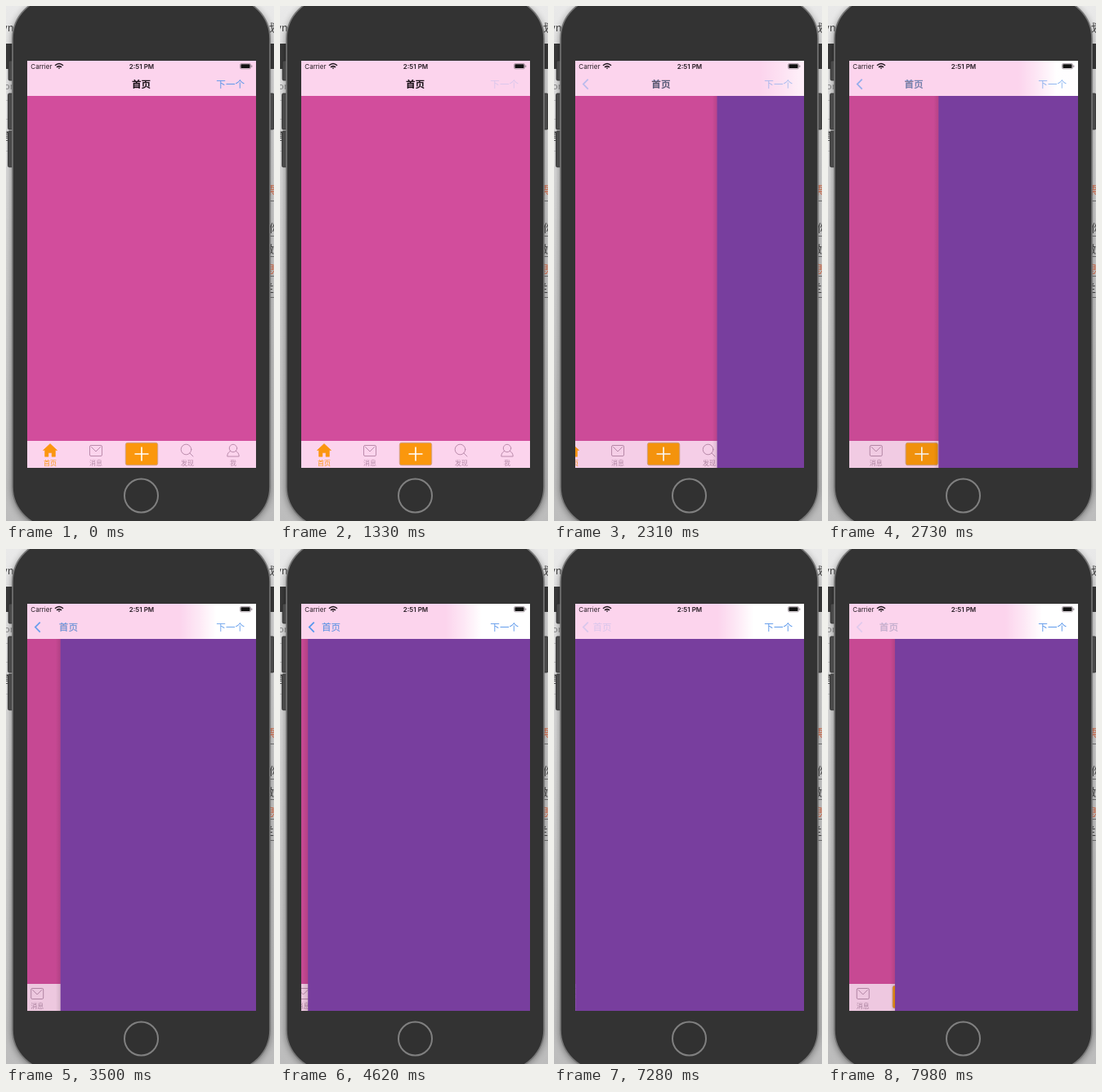
Recreate the animation shown at these times as an HTML page. Size 328 by 630 pixels, loop 8000 ms.

```html
<!DOCTYPE html>
<html lang="zh-CN">
<head>
<meta charset="utf-8">
<style>
html, body { margin: 0; width: 100%; height: 100%; overflow: hidden; background: #ccc; }
svg { display: block; width: 328px; height: 630px; }
text { font-family: "Noto Sans CJK SC", "Noto Sans CJK", sans-serif; }
.latin { font-family: Inter, Roboto, sans-serif; font-size: 8px; fill: #241a22; }
.nav { font-size: 11.6px; text-anchor: middle; }
.tab { font-size: 8px; text-anchor: middle; fill: #b58aa8; }
.icon { fill: none; stroke: #bb8cac; stroke-width: 1; stroke-linejoin: round; stroke-linecap: round; }
.line { fill: none; stroke: #777; stroke-width: 1; }
.side { font-size: 13px; fill: #444; }
.hot { fill: #df6a45; }
</style>
</head>
<body>
<svg viewBox="0 0 328 630">
  <defs>
    <linearGradient id="wall" x2="0" y2="1">
      <stop offset="0" stop-color="#e9e9e9"/>
      <stop offset=".3" stop-color="#d9d9d9"/>
      <stop offset="1" stop-color="#bcbcbc"/>
    </linearGradient>
    <linearGradient id="fade" gradientUnits="userSpaceOnUse" x1="200" x2="244" y1="0" y2="0">
      <stop offset="0" stop-color="#fff" stop-opacity="0"/>
      <stop offset=".5" stop-color="#fff" stop-opacity=".45"/>
      <stop offset="1" stop-color="#fff"/>
    </linearGradient>
    <linearGradient id="shade">
      <stop offset="0" stop-opacity="0"/>
      <stop offset="1" stop-opacity=".1"/>
    </linearGradient>
    <filter id="blur" x="-10%" width="120%" y="-10%" height="120%"><feGaussianBlur stdDeviation="4"/></filter>
    <clipPath id="view"><rect x="26" y="110" width="280" height="455"/></clipPath>
  </defs>

  <!-- desktop behind the phone -->
  <rect width="328" height="630" fill="url(#wall)"/>
  <rect y="46" width="328" height="31" fill="#3a3a3a"/>
  <g class="side">
    <text x="-5" y="31">yn</text>
    <text x="-2" y="102" font-size="11" fill="#888">or</text>
    <text x="-5" y="164">言</text>
    <text x="322" y="31">划</text>
    <text x="317" y="230" class="hot">票</text>
    <text x="322" y="276">你</text>
    <text x="315" y="302">微</text>
    <text x="317" y="326" class="hot">息</text>
    <text x="315" y="350">兰</text>
  </g>
  <path class="line" d="M0 115.5H9M0 138.5H9M0 177.5H9" opacity=".35"/>
  <path class="line" d="M320 238.5h8M320 281.5h8M320 306.5h8M320 330.5h8M320 356.5h8"/>
  <rect x="7" y="-8" width="317" height="648" rx="51" opacity=".4" filter="url(#blur)"/>

  <!-- phone body -->
  <g fill="#4a4a4a" stroke="#2c2c2c" stroke-width=".8">
    <rect x="3" y="67" width="8" height="24" rx="1.5"/>
    <rect x="2.5" y="107" width="8" height="44" rx="1.5"/>
    <rect x="2.5" y="153" width="8" height="44" rx="1.5"/>
    <rect x="320" y="107" width="8" height="44" rx="1.5"/>
  </g>
  <rect x="8" y="-10" width="315" height="648" rx="50" fill="#333" stroke="#777" stroke-width="1.6"/>
  <circle cx="165.5" cy="599" r="20.5" fill="#313131" stroke="#808080" stroke-width="2"/>

  <!-- pages -->
  <g clip-path="url(#view)">
    <g id="home">
      <rect x="26" y="110" width="280" height="422" fill="#d24d9c"/>
      <rect x="26" y="532" width="280" height="33" fill="#fcd4ed"/>
      <path d="M54 535.5l8.6 8h-2.2v7.7h-4.3v-4.6h-4.2v4.6h-4.3v-7.7h-2.2z" fill="#fb960f" stroke="#fb960f" stroke-width=".6" stroke-linejoin="round"/>
      <g class="icon">
        <rect x="102.5" y="537.5" width="15" height="13" rx="1.5"/>
        <path d="M104.5 539.5l5.5 5.5 5.5-5.5"/>
        <circle cx="220.5" cy="542.5" r="6.3"/>
        <path d="M225 547l4 4"/>
        <circle cx="278" cy="541" r="4.7"/>
        <path d="M274.6 544.5c-2.5 1.2-3.8 3.5-3.8 6.5h14.4c0-3-1.3-5.3-3.8-6.5"/>
      </g>
      <rect x="146.3" y="534.3" width="39.4" height="27.4" rx="2.5" fill="#fb970d" stroke="#d3a083" stroke-width="1"/>
      <path d="M157.5 548h17M166 539.5v17" stroke="#fff" stroke-width="1.6"/>
      <text class="tab" x="54" y="562.3" style="fill:#fb960f">首页</text>
      <text class="tab" x="110" y="562.3">消息</text>
      <text class="tab" x="222" y="562.3">发现</text>
      <text class="tab" x="278" y="562.3">我</text>
    </g>
    <rect id="dim" x="26" y="110" width="280" height="455"/>
    <g id="next">
      <rect x="20" y="110" width="6" height="455" fill="url(#shade)"/>
      <rect x="26" y="110" width="282" height="455" fill="#783e9e"/>
    </g>
  </g>

  <!-- bars -->
  <rect x="26" y="67" width="280" height="43" fill="#fcd4ed"/>
  <rect id="white" x="26" y="67" width="280" height="43" fill="url(#fade)"/>
  <text class="latin" x="30.3" y="77">Carrier</text>
  <g fill="none" stroke="#1c141a" stroke-width="1.5">
    <path d="M60 72.8q5-4.6 10 0M62 74.9q3-2.6 6 0"/>
    <path d="M63.6 75.6l1.4 1.6 1.4-1.6z" fill="#1c141a" stroke="none"/>
  </g>
  <text class="latin" x="166" y="77" text-anchor="middle" font-weight="600">2:51 PM</text>
  <rect x="286.5" y="70.5" width="13" height="6.4" rx="1.6" fill="none" stroke="#8d7d88" stroke-width=".7"/>
  <rect x="287.4" y="71.3" width="11.2" height="4.8" rx=".8" fill="#111"/>
  <path d="M300.8 72.5v2.4" stroke="#8d7d88" stroke-width="1"/>
  <path id="arrow" d="M41.7 89.6l-5.9 6 5.9 6" fill="none" stroke="#4f94ec" stroke-width="1.7"/>
  <g id="label" class="nav">
    <text id="title" y="100" font-weight="700" fill="#160e14">首页</text>
    <text id="back" y="100" fill="#4f8fe6">首页</text>
  </g>
  <text id="more" class="nav" x="274.7" y="100" fill="#5795ea">下一个</text>
</svg>
<script>
const LOOP = 8000, STEP = 70, RATE = 0.00176;
const PUSH = 1560, POP = 7512, LAG = 88;
const TAP_MORE = 1050, TAP_BACK = 7210, PRESSED = 0.2;
const el = id => document.getElementById(id);
const set = (id, name, value) => el(id).setAttribute(name, value);
const move = (id, x) => set(id, "transform", `translate(${x.toFixed(2)} 0)`);

// critically damped spring from 0 to 1
function spring(ms) {
  const x = Math.max(0, ms) * RATE;
  return 1 - (1 + x) * Math.exp(-x);
}
const shown = t => t < POP ? spring(t - PUSH) : 1 - spring(t - POP);

function draw(t) {
  const p = shown(t);
  const q = t < POP ? spring(t - PUSH - LAG) : 1 - spring(t - POP - LAG);
  const rest = 280 * (1 - p);

  move("home", -84 * p);
  move("next", rest);
  set("next", "visibility", p > 0 ? "visible" : "hidden");
  set("dim", "opacity", 0.07 * p);

  set("fade", "x1", 200 + 0.3 * rest);
  set("fade", "x2", 244 + 0.32 * rest);
  set("white", "opacity", Math.min(1, 1.6 * p));

  const touch = t < TAP_BACK ? 1 : PRESSED;
  move("label", 59 + 106.5 * (1 - q));
  set("title", "opacity", 1 - q);
  set("back", "opacity", q * touch);
  set("arrow", "opacity", p * touch);

  const old = (t < TAP_MORE ? 1 : PRESSED) * (1 - p);
  set("more", "opacity", t < POP ? Math.min(1, old + p) : 1);
}

function tick(now) {
  draw(Math.floor((now % LOOP) / STEP) * STEP);
  requestAnimationFrame(tick);
}
draw(0);
requestAnimationFrame(tick);
</script>
</body>
</html>
```
